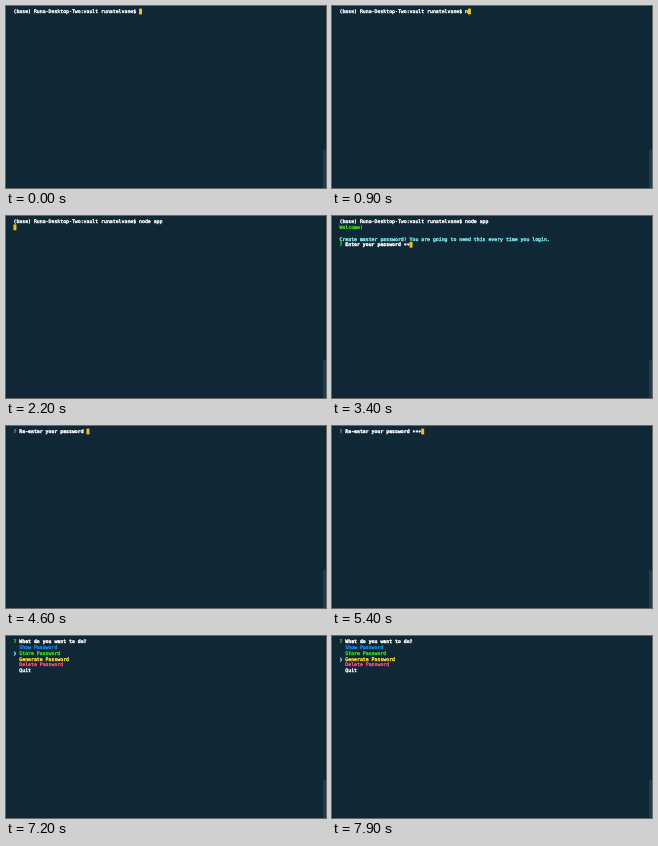
Recreate the animation shown at these times as an HTML page with a canvas. Size 320 px wide and 182 px high, loop 8000 ms.

```html
<!DOCTYPE html>
<html lang="en">
<head>
<meta charset="utf-8">
<title>Password vault in a terminal</title>
<style>
html, body { margin: 0; width: 320px; height: 182px; overflow: hidden; background: #102735; }
canvas { display: block; width: 320px; height: 182px; }
</style>
</head>
<body>
<canvas id="screen"></canvas>
<script>
const LOOP = 8000;
const LEFT = 7.5, TOP = 2.6, CELL = 2.92, LINE = 5.8, SIZE = 4.85, WEIGHT = 0.38;
const WHITE = '#ffffff', GREEN = '#38de21', CYAN = '#7ceef5', BLUE = '#1b8be6',
      YELLOW = '#ffe52a', PINK = '#f8507f', GREY = '#7f919b', CURSOR = '#f3c11c';

const PROMPT = '(base) Runa-Desktop-Two:vault runatelvane$ ';
const COMMAND = 'node app';
const COMMAND_KEYS = [800, 1000, 1100, 1200, 1400, 1600, 1700, 1800];
const FIRST_KEYS = [3100, 3400, 3600];
const SECOND_KEYS = [5100, 5300, 5400];
const MENU = [
  ['Show Password', BLUE],
  ['Store Password', GREEN],
  ['Generate Password', YELLOW],
  ['Delete Password', PINK],
  ['Quit', WHITE]
];
const ARROW_KEYS = [7000, 7400];

const canvas = document.getElementById('screen');
const ctx = canvas.getContext('2d');
const ratio = window.devicePixelRatio || 1;
canvas.width = 320 * ratio;
canvas.height = 182 * ratio;
ctx.scale(ratio, ratio);
ctx.textRendering = 'geometricPrecision';
ctx.lineWidth = WEIGHT;
ctx.lineJoin = 'round';

const pressed = (keys, t) => keys.filter(k => k <= t).length;

// Writes on the character grid and returns the column after the text.
function write(row, col, text, color, bold) {
  ctx.font = `${bold ? 'bold ' : ''}${SIZE}px "DejaVu Sans Mono", monospace`;
  ctx.fillStyle = ctx.strokeStyle = color;
  for (const char of text) {
    const x = LEFT + col++ * CELL, y = TOP + row * LINE + 4.55;
    ctx.fillText(char, x, y);
    ctx.strokeText(char, x, y); // thickens the strokes
  }
  return col;
}

function cursor(row, col) {
  ctx.fillStyle = CURSOR;
  ctx.fillRect(LEFT + col * CELL, TOP + row * LINE, CELL, LINE);
}

function question(row, text, markColor = GREEN) {
  write(row, 0, '?', markColor);
  return write(row, 2, text + ' ', WHITE, true);
}

function passwordField(row, label, keys, t, markColor) {
  const col = question(row, label, markColor);
  cursor(row, write(row, col, '∗'.repeat(pressed(keys, t)), WHITE));
}

function shell(t) {
  const typed = COMMAND.slice(0, pressed(COMMAND_KEYS, t));
  const end = write(0, 0, PROMPT + typed, WHITE);
  if (t < 2000) cursor(0, end);
  else if (t < 2600) cursor(1, 0);
}

function welcome(t) {
  write(1, 0, 'Welcome!', GREEN);
  write(3, 0, 'Create master password! You are going to need this every time you login.', CYAN);
  passwordField(4, 'Enter your password', FIRST_KEYS, t);
}

function menu(t) {
  const selected = pressed(ARROW_KEYS, t);
  const col = question(0, 'What do you want to do?');
  if (!selected) write(0, col, '(Use arrow keys)', GREY);
  MENU.forEach(([label, color], i) => write(i + 1, 2, label, color));
  write(selected + 1, 0, '❯', CYAN);
}

function draw(now) {
  const t = now % LOOP;
  ctx.fillStyle = '#102735';
  ctx.fillRect(0, 0, 320, 182);
  ctx.fillStyle = '#1f3b4e';
  ctx.fillRect(317, 144, 3, 38);

  if (t < 4600) {
    shell(t);
    if (t >= 2600) welcome(t);
  } else if (t < 5800) {
    passwordField(0, 'Re-enter your password', SECOND_KEYS, t, GREY);
  } else {
    menu(t);
  }
  requestAnimationFrame(draw);
}
requestAnimationFrame(draw);
</script>
</body>
</html>
```
